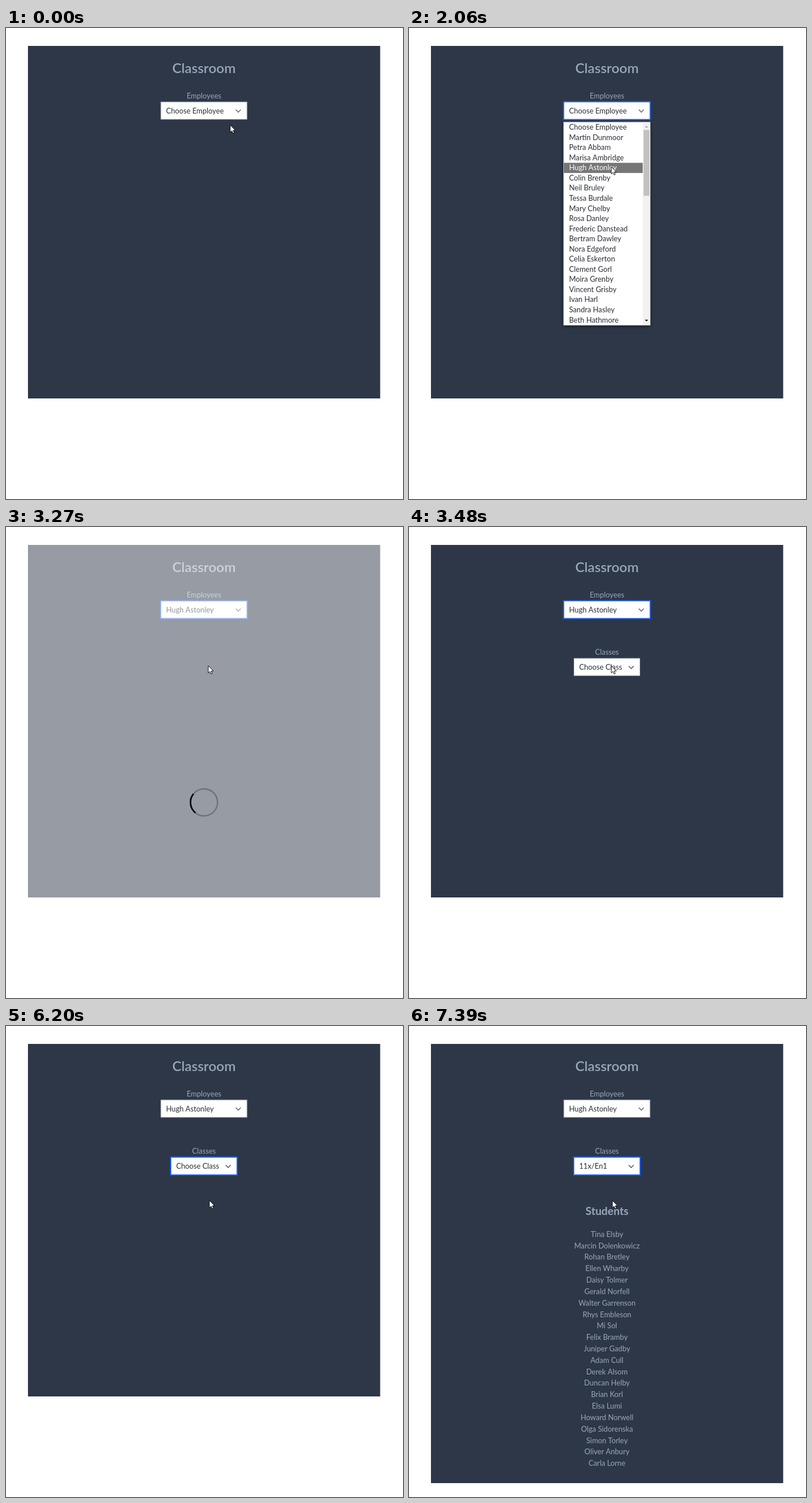
Write an HTML page with a canvas that moves like this. It is 687x815 px and loops after 9.52 s.

```html
<!DOCTYPE html>
<html lang="en">
<head>
<meta charset="utf-8">
<title>Classroom</title>
<style>
  html, body { margin: 0; width: 100%; height: 100%; overflow: hidden; background: #fff; }
  canvas { display: block; }
</style>
</head>
<body>
<canvas id="stage" width="687" height="815"></canvas>
<script>
const ctx = document.getElementById('stage').getContext('2d');
const LOOP = 9520, CENTER = 342.6, ROW = 17.55;
const MUTED = '#9aa7b8', INK = '#2b2f36';

const employees = ['Choose Employee', 'Martin Dunmoor', 'Petra Abbam', 'Marisa Ambridge',
  'Hugh Astonley', 'Colin Brenby', 'Neil Bruley', 'Tessa Burdale', 'Mary Chelby', 'Rosa Danley',
  'Frederic Danstead', 'Bertram Dawley', 'Nora Edgeford', 'Celia Eskerton', 'Clement Gorl',
  'Moira Grenby', 'Vincent Grisby', 'Ivan Harl', 'Sandra Hasley', 'Beth Hathmore'];
const classes = ['Choose Class', '10x/En2', '11x/En1', '11y/En3', '12x/En1', '7y/En2', '9x/En1'];
const students = ['Tina Elsby', 'Marcin Dolenkowicz', 'Rohan Bretley', 'Ellen Wharby', 'Daisy Tolmer',
  'Gerald Norfell', 'Walter Garrenson', 'Rhys Embleson', 'Mi Sol', 'Felix Bramby', 'Juniper Gadby',
  'Adam Cull', 'Derek Alsom', 'Duncan Helby', 'Brian Korl', 'Elsa Lumi', 'Howard Norwell',
  'Olga Sidorenska', 'Simon Torley', 'Oliver Anbury', 'Carla Lorne'];

// Pointer path: time, x, y
const pointerPath = [[20, 388, 168], [380, 360, 146], [1030, 360, 146], [1320, 359.7, 163.5],
  [1390, 359.5, 164], [1960, 351, 231.5], [2000, 351, 231.5], [2060, 350, 240],
  [4990, 350, 240], [5750, 352, 302]];

// Loader periods; angle is the spinner's rotation in degrees at time `at`
const loaders = [
  { show: 2385, fade: 3305, hide: 3480, angle: 187, at: 2400 },
  { show: 6230, fade: 7145, hide: 7390, angle: 74, at: 6900 }
];

const clamp = v => Math.max(0, Math.min(1, v));

function pointerAt(t) {
  const next = pointerPath.findIndex(p => p[0] > t);
  if (next === 0) return pointerPath[0].slice(1);
  if (next < 0) return pointerPath.at(-1).slice(1);
  const [t0, x0, y0] = pointerPath[next - 1], [t1, x1, y1] = pointerPath[next];
  let k = (t - t0) / (t1 - t0);
  if (next === 1 || next === pointerPath.length - 1) k = k * k * (3 - 2 * k);
  return [x0 + (x1 - x0) * k, y0 + (y1 - y0) * k];
}

function rect(x, y, w, h, color) {
  ctx.fillStyle = color;
  ctx.fillRect(x, y, w, h);
}

function text(value, x, y, color, { size = 12.7, weight = 400, align = 'left' } = {}) {
  ctx.font = `${weight} ${size}px Lato, "Open Sans", sans-serif`;
  ctx.textAlign = align;
  ctx.fillStyle = color;
  ctx.fillText(value, x, y);
}

const centered = (value, y, style) => text(value, CENTER, y, MUTED, { align: 'center', ...style });

function polygon(points, color) {
  ctx.beginPath();
  points.forEach(([x, y]) => ctx.lineTo(x, y));
  ctx.closePath();
  ctx.fillStyle = color;
  ctx.fill();
}

function selectBox(x, y, w, value, focus) {
  if (focus) rect(x - 1, y - 1, w + 2, 33, focus);
  else rect(x, y, w, 31, '#a5abb4');
  rect(x + 1, y + 1, w - 2, 29, '#fff');
  text(value, x + 9.5, y + 20.3, INK);
  const cx = x + w - 15.5, cy = y + 16;
  ctx.beginPath();
  ctx.moveTo(cx - 4.3, cy - 2.2);
  ctx.lineTo(cx, cy + 2.2);
  ctx.lineTo(cx + 4.3, cy - 2.2);
  ctx.strokeStyle = '#616b78';
  ctx.lineWidth = 1.6;
  ctx.stroke();
}

function popup(x, y, w, options, pointerY, scrollbar) {
  const h = options.length * ROW + 1.5;
  ctx.save();
  ctx.shadowColor = 'rgba(0,0,0,.45)';
  ctx.shadowBlur = 5;
  ctx.shadowOffsetY = 2;
  rect(x, y, w, h, '#b0b3b8');
  ctx.restore();
  rect(x + 1, y + 1, w - 2, h - 2, '#fff');
  const active = Math.max(0, Math.floor((pointerY - y - 0.6) / ROW));
  options.forEach((option, i) => {
    const top = y + 0.8 + i * ROW;
    if (i === active) rect(x + 1, top, w - (scrollbar ? 14 : 2), ROW, '#767676');
    text(option, x + 10, top + 13, i === active ? '#fff' : INK);
  });
  if (!scrollbar) return;
  const left = x + w - 13.5, mid = left + 6.5;
  rect(left, y + 1, 12.5, h - 2, '#f1f1f1');
  rect(left + 1.5, y + 14, 10, 114, '#c1c1c1');
  polygon([[mid - 3, y + 10], [mid, y + 7], [mid + 3, y + 10]], '#a3a3a3');
  polygon([[mid - 3, y + h - 10], [mid, y + h - 7], [mid + 3, y + h - 10]], '#111');
}

function loader(t, { show, fade, hide, angle, at }) {
  if (t < show || t >= hide) return;
  const opacity = 1 - clamp((t - fade) / (hide - fade));
  ctx.save();
  ctx.globalAlpha = opacity;
  rect(0, 0, 687, 815, 'rgba(255,255,255,.5)');
  ctx.translate(CENTER, 476.5);
  ctx.rotate((angle + (t - at) * 0.45) * Math.PI / 180);
  ctx.lineWidth = 2.6;
  ctx.strokeStyle = 'rgba(0,0,0,.25)';
  ctx.beginPath();
  ctx.arc(0, 0, 23.4, 0, Math.PI * 2);
  ctx.stroke();
  ctx.strokeStyle = '#000';
  ctx.beginPath();
  ctx.arc(0, 0, 23.4, -Math.PI / 2, 0);
  ctx.stroke();
  ctx.restore();
}

function pointer(x, y) {
  ctx.save();
  ctx.translate(x, y);
  const arrow = new Path2D('M0 0V12.6L2.9 9.9L4.8 14.3L6.9 13.4L5 9.1H8.9Z');
  ctx.fillStyle = '#fff';
  ctx.strokeStyle = '#000';
  ctx.lineWidth = 0.9;
  ctx.fill(arrow);
  ctx.stroke(arrow);
  ctx.restore();
}

function draw(t) {
  const [px, py] = pointerAt(t);
  const hasClasses = t >= 3320, hasStudents = t >= 7160;
  rect(0, 0, 687, 815, '#fff');
  rect(38, 31, 609.5, hasStudents ? 760 : 610, '#2d3748');
  centered('Classroom', 77.8, { size: 23.8, weight: 600 });
  centered('Employees', 122.3);
  selectBox(267.5, 127.5, 150, employees[t < 2385 ? 0 : 4], t >= 620 && t < 4590 && '#245fd2');

  if (hasClasses) {
    centered('Classes', 221.3);
    selectBox(285, 226.8, 115, classes[t < 6230 ? 0 : 2], t >= 4590 && '#1c60ff');
  }
  if (hasStudents) {
    centered('Students', 326.7, { size: 18.9, weight: 700 });
    students.forEach((name, i) => centered(name, 364.7 + i * 19.83));
  }
  if (t >= 640 && t < 2360) popup(267, 162.3, 151, employees, py, true);
  if (t >= 4620 && t < 6200) popup(284.7, 261.8, 115.5, classes, py, false);

  loaders.forEach(l => loader(t, l));
  pointer(px, py);
}

const start = performance.now();
function tick() {
  draw((performance.now() - start) % LOOP);
  requestAnimationFrame(tick);
}
tick();
</script>
</body>
</html>
```
